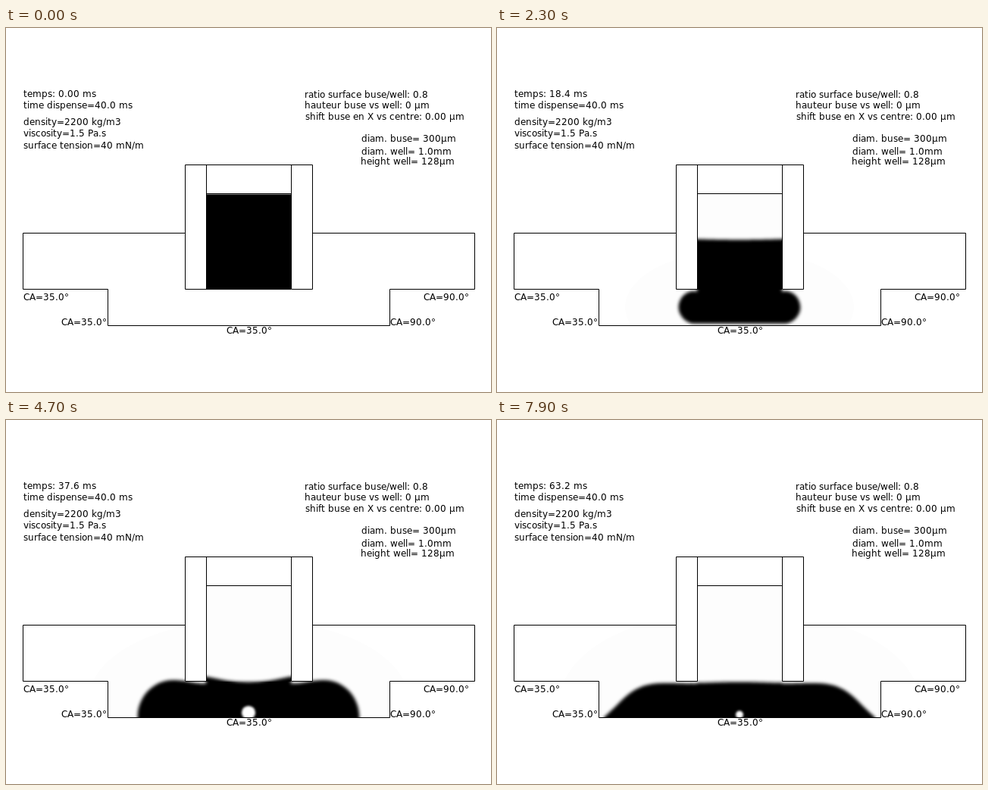
These frames come from a looping animation (640x480 px, 8 s). An HTML page:

```html
<!DOCTYPE html>
<html lang="fr">
<head>
<meta charset="utf-8">
<title>Dispense simulation</title>
<style>
  html, body { margin: 0; width: 100%; height: 100%; overflow: hidden; background: #fff; }
  svg { display: block; width: 640px; height: 480px; }
  text { font: 12px "DejaVu Sans", sans-serif; fill: #000; white-space: pre; }
  .lines { fill: none; stroke: #000; stroke-width: 1; }
</style>
</head>
<body>
<svg viewBox="0 0 640 480">
  <defs>
    <clipPath id="bore"><rect x="264" y="218" width="112" height="127"/></clipPath>
    <clipPath id="well">
      <path d="M236 345V271H22V345H134V392.5H506.5V345H618V271H404V345Z"/>
    </clipPath>
    <filter id="soft" filterUnits="userSpaceOnUse" x="0" y="150" width="640" height="300">
      <feGaussianBlur id="blur" stdDeviation="2"/>
    </filter>
    <filter id="softBubble" filterUnits="userSpaceOnUse" x="200" y="340" width="240" height="80">
      <feGaussianBlur stdDeviation="1.5"/>
    </filter>
  </defs>

  <rect x="264" y="218" width="112" height="127" fill="#fdfdfd"/>
  <g clip-path="url(#well)">
    <ellipse id="halo" cx="320" cy="368" fill="#fdfdfd"/>
    <path id="drop" filter="url(#soft)"/>
    <ellipse id="bubble" cx="320" fill="#fff" filter="url(#softBubble)"/>
  </g>
  <g clip-path="url(#bore)"><path id="column" filter="url(#soft)"/></g>
  <path id="meniscus" d="M265 219.5H376" stroke="#777"/>

  <path class="lines" d="M236.5 270.5H22.5V344.5H134.5V392.5H506.5V344.5H618.5V270.5H404.5
    M236.5 180.5H404.5V344.5H376.5V180.5M264.5 180.5V344.5H236.5V180.5M264.5 218.5H376.5"/>
  <g id="labels"></g>
</svg>
<script>
const LOOP = 8000, STEP = 100;
const CX = 320, BORE = 56, LIP = 344.5, FLOOR = 392;
const TOUCH = 2.4, PUMP_END = 5;   // seconds

const $ = id => document.getElementById(id);
const clamp = (v, lo = 0, hi = 1) => Math.max(lo, Math.min(hi, v));
const mix = (a, b, u) => a + (b - a) * u;
const saturate = (s, tau) => 1 - Math.exp(-Math.max(0, s) / tau);

const pen = document.createElement('canvas').getContext('2d');
pen.font = '12px "DejaVu Sans", sans-serif';

// Each glyph starts on a whole pixel, as in unscaled screen text.
function write(el, x, content) {
  const stops = [...content].map(char => {
    const at = x;
    x += Math.round(pen.measureText(char).width);
    return at;
  });
  el.setAttribute('x', stops.join(' '));
  el.textContent = content;
}

function label(x, y, content) {
  const el = document.createElementNS('http://www.w3.org/2000/svg', 'text');
  el.setAttribute('y', y);
  write(el, x, content);
  return $('labels').appendChild(el);
}

const clock = label(23, 91, '');
label(23, 106, 'time dispense=40.0 ms');
label(23, 128, 'density=2200 kg/m3');
label(23, 143, 'viscosity=1.5 Pa.s');
label(23, 159, 'surface tension=40 mN/m');
label(394, 92, 'ratio surface buse/well: 0.8');
label(394, 106, 'hauteur buse vs well: 0 µm');
label(395, 121, 'shift buse en X vs centre: 0.00 µm');
label(469, 150, 'diam. buse= 300µm');
label(469, 167, 'diam. well= 1.0mm');
label(468, 180, 'height well= 128µm');
label(23, 359, 'CA=35.0°');
label(73, 392, 'CA=35.0°');
label(291, 403, 'CA=35.0°');
label(507, 392, 'CA=90.0°');
label(551, 359, 'CA=90.0°');

// Top of the liquid: sinks while pumped, dips in the middle, then rests at the lip.
function surface(s, half) {
  const wall = Math.min(218.5 + 26.7 * s - 0.3 * s * s, 346.5);
  const centre = Math.min(wall + 0.08 * s ** 3, 345.5);
  const bend = half * 0.55;
  return `M${CX - half} ${wall}C${CX - bend} ${wall} ${CX - bend} ${centre} ${CX} ${centre}` +
    `S${CX + bend} ${wall} ${CX + half} ${wall}`;
}

// Right half of the drop as cubic segments: lip, crest, belly, base.
function dropSide(s) {
  const wet = clamp((s - TOUCH) / 0.8);
  const settle = saturate(s - PUMP_END, 0.8);
  const reach = 57 + 27.5 * clamp(s - 1.45, 0, 3.55) + 25 * settle;
  const bottom = LIP + 48 * saturate(s, 0.8);
  const bulge = 5 * Math.exp(-((s - 5.2) ** 2));

  const lip = [BORE, Math.min(347.5, bottom)];
  const inset = 20 + 0.006 * Math.max(0, reach - 80) ** 2;
  const crest = [Math.max(BORE, reach - inset), Math.min(347 - bulge, bottom)];
  const hang = 0.25 + 0.012 * (reach - 57);
  const belly = [reach, mix(mix(LIP, bottom, Math.min(hang, 1)), FLOOR, wet)];
  const corner = Math.max(20, 32 - (reach - 57) / 2) * (1 - wet);
  const base = [reach - corner, mix(bottom, FLOOR + 10, wet)];

  const mid = (lip[0] + crest[0]) / 2;
  const width = belly[0] - crest[0], height = belly[1] - crest[1];
  const drop = base[1] - belly[1];
  return [
    lip,
    [mid, lip[1]], [mid, crest[1]], crest,
    [crest[0] + 0.55 * width, crest[1]],
    [reach - 28 * settle, belly[1] - height * mix(0.55, 0.5, settle)], belly,
    [reach, belly[1] + 0.55 * drop], [base[0] + 0.45 * corner, base[1]], base
  ];
}

function dropPath(s) {
  const side = dropSide(s);
  const right = side.map(([x, y]) => [CX + x, y]);
  const left = side.map(([x, y]) => [CX - x, y]).reverse();
  return `${surface(s, BORE)}L${right[0]}C${right.slice(1).join(' ')}` +
    `L${left[0]}C${left.slice(1).join(' ')}Z`;
}

// Gas trapped under the drop: a flat pocket that rounds up, then slowly shrinks.
function bubbleShape(s) {
  const age = s - TOUCH;
  if (age <= 0) return { cy: FLOOR, rx: 0, ry: 0 };
  const rx = 9 + 40 * Math.exp(-age / 0.45) - 1.2 * Math.max(0, s - 4.6);
  const ry = Math.min(rx, 9) * clamp(age / 0.5);
  return { cy: FLOOR - 0.68 * ry * clamp((age - 0.8) / 0.6), rx, ry };
}

function set(id, attrs) {
  for (const name in attrs) $(id).setAttribute(name, attrs[name]);
}

function render(now) {
  const step = Math.floor((now % LOOP) / STEP);
  const s = step * STEP / 1000;
  const ms = step * 0.8;
  write(clock, 23, `temps: ${ms.toFixed(ms < 10 ? 2 : 1)} ms`);

  set('blur', { stdDeviation: clamp(7 * s, 0.05, 2.2) });
  set('column', { d: surface(s, 75) + `V380H${CX - 75}Z` });
  set('drop', { d: dropPath(s) });
  set('bubble', bubbleShape(s));
  const halo = 245 * saturate(s, 2.4);
  set('halo', { rx: halo, ry: halo / 2 });
  set('meniscus', { visibility: step ? 'hidden' : 'visible' });
}

const start = performance.now();
function tick() {
  render(performance.now() - start);
  requestAnimationFrame(tick);
}
tick();
</script>
</body>
</html>
```
